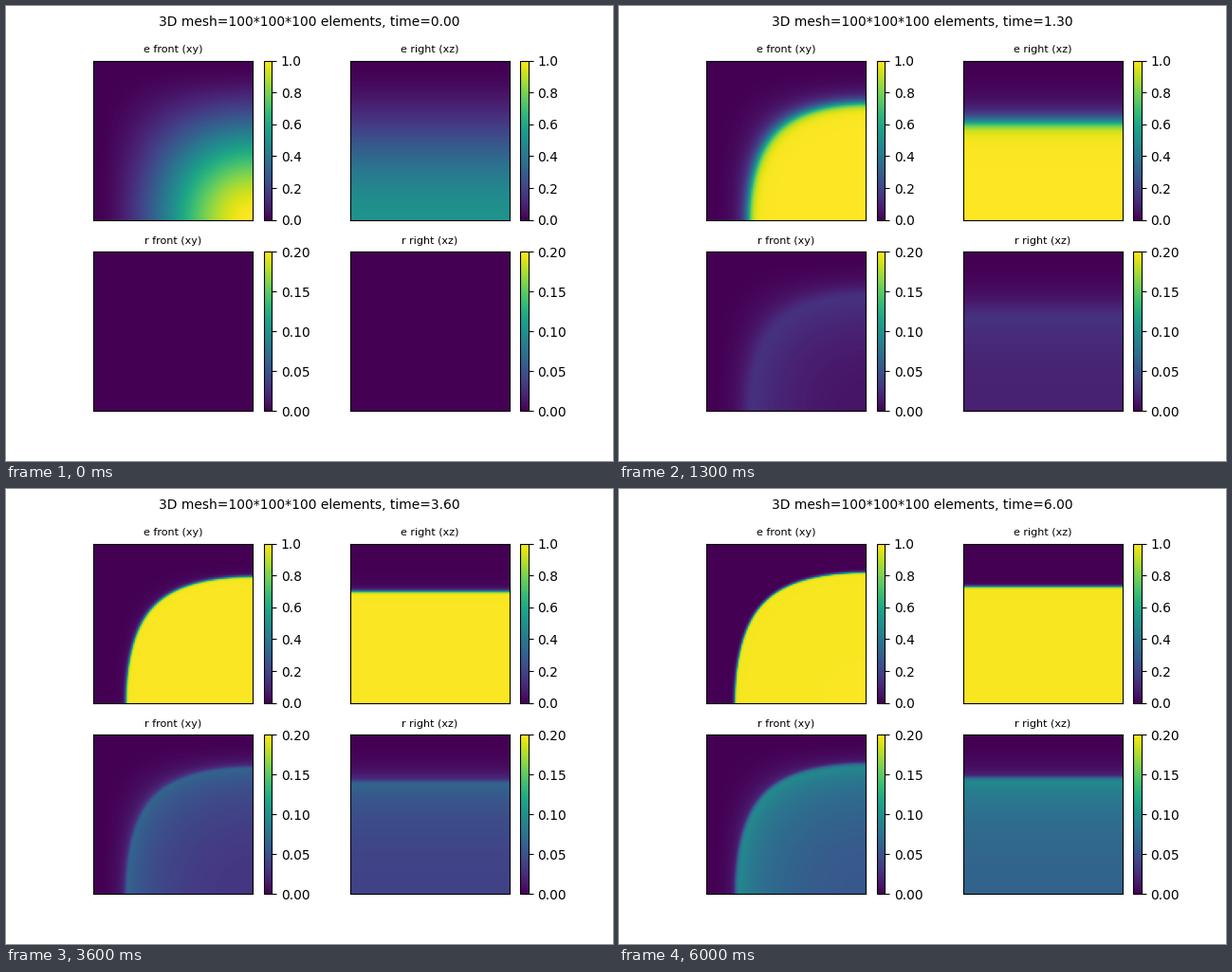
A matplotlib script for the animation above (6.1 s loop, 640 px wide and 480 px high).

```python
import numpy as np
import matplotlib.pyplot as plt
from matplotlib.animation import FuncAnimation

# Aliev-Panfilov model of an excitable medium: e = excitation, r = recovery
N = 100
FRAMES = 61
FRAME_TIME = 0.1
SUBSTEPS = 20
DT = FRAME_TIME / SUBSTEPS

DIFFUSION = 5e-5 * N ** 2
K, A, B = 8.0, 0.1, 0.1
EPS, MU1, MU2 = 0.01, 0.07, 0.3


def laplacian(f):
    """Five-point Laplacian with zero-flux borders."""
    p = np.pad(f, 1, mode="edge")
    return p[:-2, 1:-1] + p[2:, 1:-1] + p[1:-1, :-2] + p[1:-1, 2:] - 4 * f


def step(e, r):
    de = DIFFUSION * laplacian(e) - K * e * (e - A) * (e - 1) - e * r
    dr = (EPS + MU1 * r / (e + MU2)) * (-r - K * e * (e - B - 1))
    return e + DT * de, r + DT * dr


def simulate():
    ramp = np.sin(np.pi / 2 * (np.arange(N) + 0.5) / N) ** 2
    e = np.outer(ramp, ramp)
    r = np.zeros_like(e)
    states = [(e, r)]
    for _ in range(FRAMES - 1):
        for _ in range(SUBSTEPS):
            e, r = step(e, r)
        states.append((e, r))
    return states


def side_view(field):
    """The field is constant in depth, so the middle column fills the view."""
    return np.repeat(field[:, N // 2:N // 2 + 1], N, axis=1)


def add_panel(ax, title, vmax):
    image = ax.imshow(np.zeros((N, N)), cmap="viridis", vmin=0, vmax=vmax)
    ax.set_title(title, fontsize=8)
    ax.set_xticks([])
    ax.set_yticks([])
    fig.colorbar(image, ax=ax)
    return image


plt.rcParams["font.family"] = "DejaVu Sans"
fig, axes = plt.subplots(2, 2, figsize=(6.4, 4.8), dpi=100)
panels = []
for row, name, vmax in zip(axes, "er", (1.0, 0.2)):
    panels.append((add_panel(row[0], f"{name} front (xy)", vmax),
                   add_panel(row[1], f"{name} right (xz)", vmax)))
heading = fig.suptitle("", fontsize=10)

states = simulate()


def draw(i):
    for (front, right), field in zip(panels, states[i]):
        front.set_data(field)
        right.set_data(side_view(field))
    heading.set_text(f"3D mesh={N}*{N}*{N} elements, time={i * FRAME_TIME:.2f}")
    return [heading, *(image for pair in panels for image in pair)]


anim = FuncAnimation(fig, draw, frames=FRAMES, interval=100,
                     repeat=True, repeat_delay=0, blit=False)
plt.show()
```
